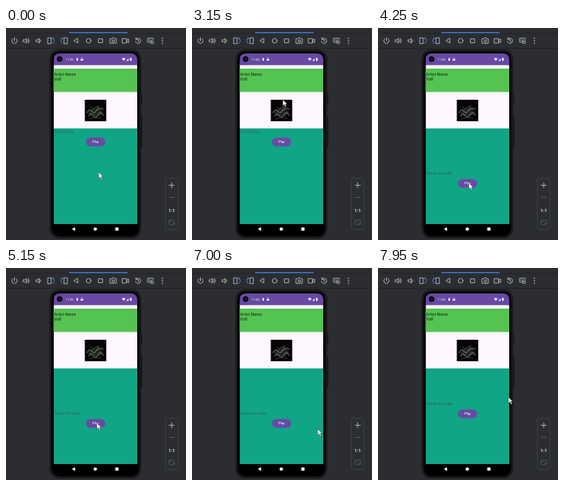
An HTML page for the animation above (8000 ms loop, 225 by 266 pixels).

```html
<!DOCTYPE html>
<html lang="en">
<head>
<meta charset="utf-8">
<title>Music player on a phone emulator</title>
<style>
  html, body { margin: 0; width: 100%; height: 100%; overflow: hidden; background: #2b2d30; }
  svg { display: block; width: 100vw; height: 100vh; }
  text { font-family: Roboto, "Open Sans", sans-serif; }
  .line { fill: none; stroke: #c3c6cc; stroke-width: .8; stroke-linecap: round; stroke-linejoin: round; }
  .blue { stroke: #5b8ce6; }
  .song { font-size: 4.8px; fill: #2f655c; }
  .label { font-size: 3.8px; font-weight: 500; fill: #fff; text-anchor: middle; }
</style>
</head>
<body>
<svg viewBox="0 0 225 266">
  <defs>
    <clipPath id="list"><rect x="59.5" y="126" width="104.5" height="120"/></clipPath>
    <clipPath id="screen"><rect x="59.5" y="32" width="104.5" height="228" rx="7"/></clipPath>
    <g id="button">
      <rect x="100" y="137.5" width="24" height="11" rx="5.5" fill="#674ba5"/>
      <text class="label" x="112" y="144.4">Play</text>
    </g>
  </defs>

  <rect width="225" height="266" fill="#2b2d30"/>
  <rect y="6.5" width="225" height=".6" fill="#1e1f22"/>
  <rect x="79" y="5" width="73" height="1.5" fill="#4675cc"/>
  <rect y="25" width="225" height=".7" fill="#1e1f22"/>

  <g class="line">
    <path d="M10.5 12v4M8.3 13.5a3.3 3.3 0 1 0 4.4 0"/>
    <path d="M21.8 14.8h1.6l1.9-1.8v6l-1.9-1.8h-1.6zM26.8 14.6q1.2 1.4 0 2.8M28 13q2.6 3 0 6"/>
    <path d="M38 14.8h1.6l1.9-1.8v6l-1.9-1.8H38zM43 14.6q1.2 1.4 0 2.8"/>
    <g id="rotate">
      <path d="M52.5 12.3h3.8v7.4h-3.8z"/>
      <path class="blue" d="M58 12.8q2.4.2 2.4 3t-2.4 3.7M58 12.8l1.2-1M58 12.8l1.2 1"/>
    </g>
    <use href="#rotate" transform="translate(128.8) scale(-1 1)"/>
    <path d="M89.8 13.2v5.6l-4.6-2.8z"/>
    <circle cx="103.3" cy="16" r="2.9"/>
    <path d="M115.9 13.6h4.9v4.9h-4.9z"/>
    <path d="M130.3 13.5h1.9l.8-1.2h2.2l.8 1.2h1.9v5.7h-7.6z"/><circle cx="134.1" cy="16.3" r="1.5"/>
    <path d="M145.6 13.3h5v5.6h-5zM150.6 15.5l2.6-1.6v4.5l-2.6-1.6"/>
    <path d="M162.3 14.2a3.3 3.3 0 1 1-.5 2.6M162.3 12.2v2h2M165 14.3v2l1.5 1"/>
    <path d="M181.2 17.8h-4.2v-5h6.8v2.1M178.8 15.2h2.8M181.6 16.5h2.6v2.8h-2.6z"/>
  </g>
  <g fill="#c3c6cc">
    <circle cx="195.5" cy="13" r=".8"/><circle cx="195.5" cy="16" r=".8"/><circle cx="195.5" cy="19" r=".8"/>
  </g>

  <path d="M169.2 83.5v11M169.2 110v40" stroke="#17181a" stroke-width="2.4"/>
  <rect x="54.5" y="27" width="114.5" height="237" rx="13" fill="#08090a"/>
  <rect x="55.7" y="28.2" width="112.1" height="234.6" rx="12" fill="#050506" stroke="#3d3f42" stroke-width=".7"/>

  <g clip-path="url(#screen)">
    <rect x="59.5" y="32" width="104.5" height="228" fill="#000"/>
    <rect x="59.5" y="32" width="104.5" height="14.5" fill="#6849a5"/>
    <rect x="59.5" y="46.5" width="104.5" height="80" fill="#fff7ff"/>
    <rect x="59.5" y="51" width="104.5" height="29.3" fill="#54c351"/>
    <rect x="59.5" y="126" width="104.5" height="120" fill="#10a585"/>
    <circle cx="67" cy="39" r="3.5" fill="#08080b"/><circle cx="67" cy="39" r="1.1" fill="#292644"/>
    <g fill="#f1ebfa">
      <text x="74.5" y="41" font-size="4">11:02</text>
      <path d="M88 37.8h2v3.1h-2zM93.4 39h3v2h-3z"/>
      <path d="M94 39v-.7a.9.9 0 0 1 1.8 0v.7" fill="none" stroke="#f1ebfa" stroke-width=".5"/>
      <path d="M144.8 38.3q2.4-1.6 4.8 0l-2.4 2.9zM150.3 41.2h3v-3.3zM155 37.8h.6v-.5h.9v.5h.6v3.4H155z"/>
    </g>
    <g font-size="5.1" fill="#12270f">
      <text x="60" y="60">Artist Name</text>
      <text x="60" y="66">VoR</text>
    </g>

    <rect x="98.5" y="90" width="26.8" height="27" fill="#050505"/>
    <ellipse cx="112" cy="106" rx="9" ry="5" fill="#242424"/>
    <g fill="none" stroke="#b5b5b5" stroke-width=".8" opacity=".8">
      <path d="M101 107q3-7 6-3t5 1 5-4 5 1"/>
      <path d="M103 111q3-6 6-1t6-1 7 1"/>
      <path d="M106 99q3 4 5 1t8 2M116 97l-4 8" stroke="#777"/>
      <path d="M104 114q8-3 15-1" stroke="#555"/>
    </g>

    <g clip-path="url(#list)"><g id="items"></g></g>

    <g fill="#fff">
      <path d="M86.3 249.9v4.8l-4-2.4z"/>
      <circle cx="111.6" cy="252.3" r="2.1"/>
      <rect x="136.6" y="250.3" width="4" height="4"/>
    </g>
  </g>

  <rect x="199.3" y="188.7" width="15.5" height="64" rx="2.5" fill="#2b2d30" stroke="#43454a" stroke-width=".8"/>
  <path class="line" d="M203.8 197.3h6.6M207.1 194v6.6"/>
  <path d="M203.8 212.5h6.6" stroke="#5a5d63" stroke-width=".8"/>
  <text x="207.1" y="230.6" font-size="5.7" font-weight="600" fill="#dfe1e5" text-anchor="middle">1:1</text>
  <path d="M203.8 241h6.6v5.8h-6.6zM205.2 243.5v-1.2h1.2M209 244.3v1.2h-1.2" fill="none" stroke="#5a5d63" stroke-width=".7"/>

  <path id="cursor" d="M0 0v7.6l1.8-1.6 1.3 3 1.4-.6-1.3-2.9h2.4z" fill="#fff" stroke="#222" stroke-width=".4"/>
</svg>

<script>
const LOOP = 8000, STEP = 50, PITCH = 122;
const songs = ["The Drifting", "Above the Lake"];

// [ms, x, y]
const pointerKeys = [
  [0, 115.8, 181], [2650, 115.8, 181], [3100, 113.5, 90], [3500, 113.5, 90],
  [4150, 113.5, 194.5], [6200, 113.5, 194.5], [6900, 157, 202], [7250, 157, 202],
  [7500, 178, 206], [7700, 168, 198], [7950, 163, 162]
];
// [ms, scroll offset]
const scrollKeys = [
  [0, 0], [3150, 0], [3450, 47], [3550, 47], [4100, 70], [7700, 70], [7950, 82]
];

const items = document.getElementById("items");
const cursor = document.getElementById("cursor");

items.innerHTML = songs.map((name, i) =>
  `<g transform="translate(0 ${i * PITCH})">
     <text class="song" x="60" y="132">${name}</text><use href="#button"/>
   </g>`).join("");

const ease = p => p * p * (3 - 2 * p);

function sample(keys, t) {
  const next = keys.findIndex(k => k[0] > t);
  if (next < 0) return keys[keys.length - 1].slice(1);
  const a = keys[next - 1], b = keys[next];
  const p = ease((t - a[0]) / (b[0] - a[0]));
  return a.slice(1).map((v, i) => v + (b[i + 1] - v) * p);
}

function draw(t) {
  const [x, y] = sample(pointerKeys, t);
  const [scroll] = sample(scrollKeys, t);
  cursor.setAttribute("transform", `translate(${x} ${y})`);
  items.setAttribute("transform", `translate(0 ${-scroll})`);
}

const start = performance.now();
function tick() {
  const t = (performance.now() - start) % LOOP;
  draw(Math.floor(t / STEP) * STEP);
  requestAnimationFrame(tick);
}
tick();
</script>
</body>
</html>
```
